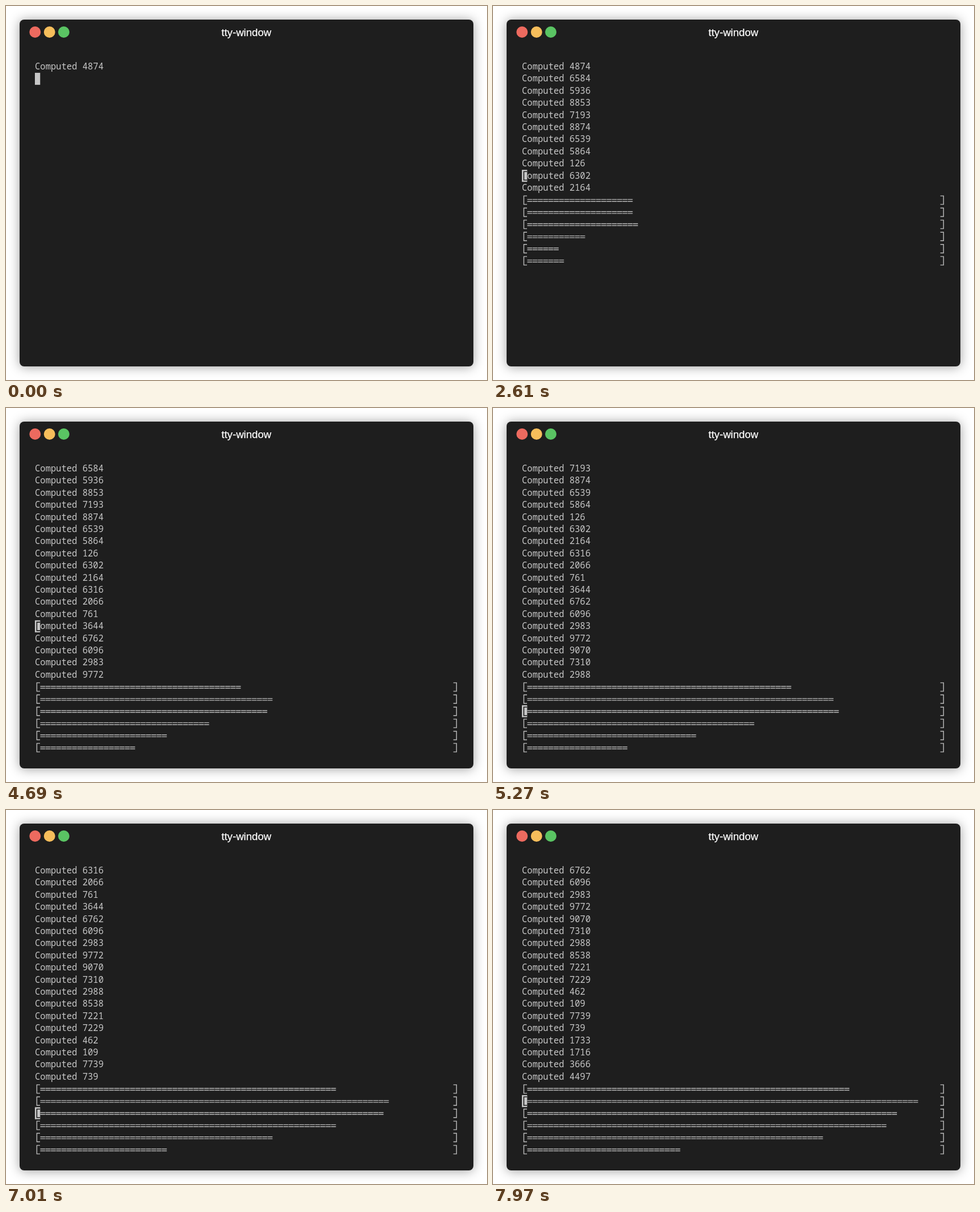
These frames come from a looping animation (849x660 px, 8000 ms). An HTML page:

```html
<!DOCTYPE html>
<html lang="en">
<head>
<meta charset="utf-8">
<title>tty-window</title>
<style>
  html, body { margin: 0; width: 100%; height: 100%; overflow: hidden; background: #fff; }
  #window {
    position: absolute; left: 24px; top: 24px; width: 801px; height: 612px;
    border-radius: 8px; background: #1e1e1e;
    box-shadow: 0 1px 20px rgba(0, 0, 0, .38);
  }
  svg { position: absolute; left: 0; top: 0; }
  .title {
    font: 18.67px "Liberation Sans", Arial, sans-serif; text-anchor: middle;
    fill: #fff; stroke: #fff; stroke-width: .25;
  }
  .line { font: 15.55px "Noto Sans Mono", "DejaVu Sans Mono", monospace; fill: #c7c7c7; }
  .bracket { fill: none; stroke: #bdbdbd; stroke-width: 1.4; }
  .fill { fill: none; stroke: #b8b8b8; stroke-width: 1.4; stroke-dasharray: 8.73 .6; }
</style>
</head>
<body>
<div id="window"></div>
<svg id="stage" width="849" height="660" viewBox="0 0 849 660">
  <circle cx="51.3" cy="46" r="10" fill="#ed6a5f"/>
  <circle cx="76.8" cy="46" r="10" fill="#f6be5b"/>
  <circle cx="102" cy="46" r="10" fill="#5ac463"/>
  <text class="title" x="424.3" y="53">tty-window</text>
</svg>
<script>
const LOOP = 8000, LEFT = 51, TOP = 96.5, CELL = 9.33, ROW = 21.4, VISIBLE = 18;
const PRINT_EVERY = 249;             // ms between printed results
const BURST_EVERY = 1024;            // ms between bar updates
const BAR_DELAY = 28;                // ms from one bar's update to the next
const BARS_SHOWN = 70;

const results = (
  "4874 6584 5936 8853 7193 8874 6539 5864 126 6302 2164 " +
  "6316 2066 761 3644 6762 6096 2983 9772 9070 7310 2988 " +
  "8538 7221 7229 462 109 7739 739 1733 1716 3666 4497"
).split(" ");

// Bar lengths at a few bursts; those between are interpolated.
const keys = [
  { burst: 0, lengths: [1, 6, 6, 2, 0, 2] },
  { burst: 1, lengths: [6, 15, 14, 7, 0, 4] },
  { burst: 2, lengths: [20, 20, 21, 11, 6, 7] },
  { burst: 4, lengths: [38, 44, 43, 32, 24, 18] },
  { burst: 5, lengths: [50, 58, 59, 43, 32, 19] },
  { burst: 7, lengths: [61, 74, 70, 68, 56, 29] }
];

// The cursor stays on one row during each burst period.
const cursorRows = [1, 1, 9, 13, 13, 20, 20, 19];

const stage = document.getElementById("stage");

function add(parent, tag, attrs) {
  const node = document.createElementNS("http://www.w3.org/2000/svg", tag);
  for (const key in attrs) node.setAttribute(key, attrs[key]);
  parent.appendChild(node);
  return node;
}

const rowTop = row => TOP + row * ROW;
const openPath = "M60 3.2H54.4V18.2H60";

const lines = Array.from({ length: VISIBLE }, (_, i) =>
  add(stage, "text", { class: "line", x: LEFT, y: rowTop(i) + 15.4 }));

const bars = Array.from({ length: 6 }, () => {
  const group = add(stage, "g", {});
  add(group, "path", { class: "bracket", d: openPath + "M789.6 3.2H795.2V18.2H789.6" });
  return { group, fill: add(group, "path", { class: "fill" }) };
});

const cursor = add(stage, "g", {});
add(cursor, "rect", { x: LEFT, y: 0, width: 9.3, height: 21.2, fill: "#c7c7c7" });
const cursorMark = add(cursor, "path", {
  d: openPath, fill: "none", stroke: "#1e1e1e", "stroke-width": 1.6
});

function barLength(i, t) {
  const burst = Math.max(0, Math.floor((t - i * BAR_DELAY) / BURST_EVERY));
  const next = Math.max(1, keys.findIndex(key => key.burst >= burst));
  const a = keys[next - 1], b = keys[next];
  const part = (burst - a.burst) / (b.burst - a.burst);
  return Math.round(a.lengths[i] + (b.lengths[i] - a.lengths[i]) * part);
}

function render(t) {
  const printed = Math.floor(t / PRINT_EVERY) + 1;
  const first = Math.max(0, printed - VISIBLE);
  const shown = printed - first;

  lines.forEach((line, i) => {
    line.textContent = i < shown ? "Computed " + results[first + i] : "";
  });

  bars.forEach(({ group, fill }, i) => {
    const end = LEFT + CELL * (1 + barLength(i, t));
    group.setAttribute("visibility", t < BARS_SHOWN ? "hidden" : "visible");
    group.setAttribute("transform", `translate(0 ${rowTop(shown + i)})`);
    fill.setAttribute("d", `M60.5 9.5H${end}M60.5 12.8H${end}`);
  });

  const row = cursorRows[Math.floor(t / BURST_EVERY)];
  cursor.setAttribute("transform", `translate(0 ${rowTop(row)})`);
  cursorMark.setAttribute("visibility", row > 1 ? "visible" : "hidden");
}

const began = performance.now();
function tick() {
  render((performance.now() - began) % LOOP);
  requestAnimationFrame(tick);
}
tick();
</script>
</body>
</html>
```
